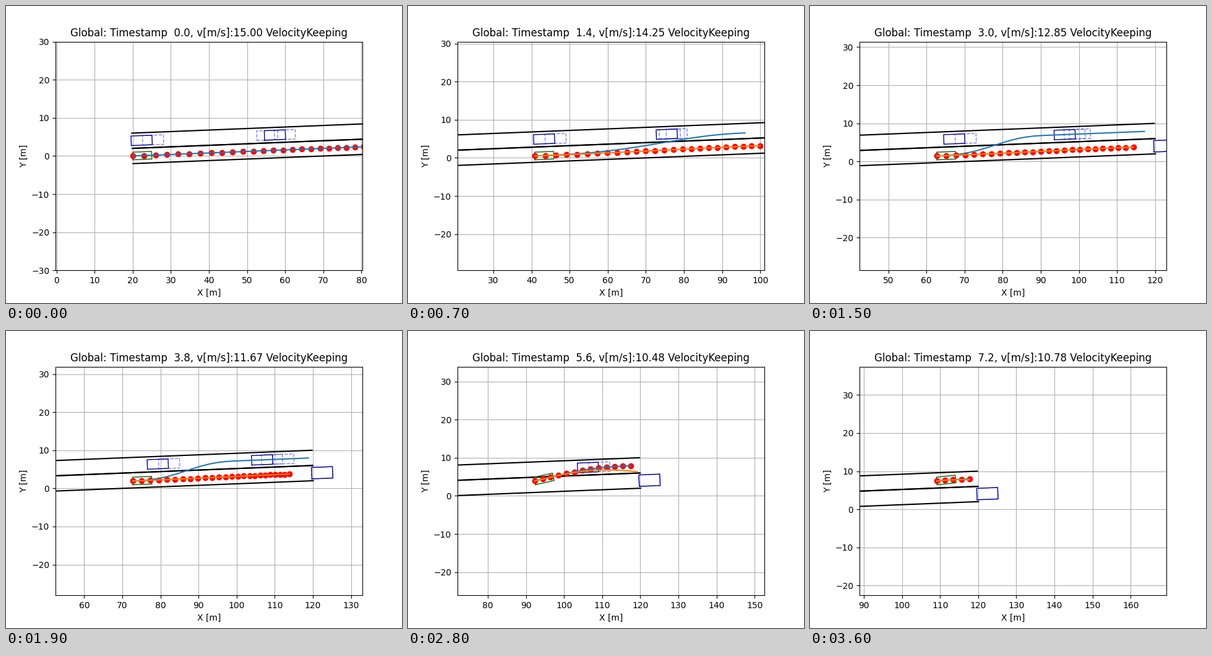
Recreate the animation shown at these times as a matplotlib script. Size 640 px wide and 480 px high, loop 3700 ms.

```python
import numpy as np
import matplotlib.pyplot as plt
from matplotlib.animation import FuncAnimation

DT, FRAMES = 0.2, 37
HORIZON, STEPS = 5.0, 25
ROAD_LEN = 100.08
THETA = np.arctan(0.04)
SWITCH, CHANGE_T0, CHANGE_T = 4.4, 4.34, 3.44

# Ego state at key times: position, speed along x, speed, acceleration
KEYS = np.array([0, 1.4, 3.0, 4.6, 5.6, 6.4, 7.2])
EGO_X = [20, 40.85, 62.7, 81.87, 92.3, 100.52, 109.12]
EGO_VX = [15, 14.25, 12.85, 10.69, 10.17, 10.35, 10.7]
EGO_V = [15, 14.25, 12.85, 10.69, 10.48, 10.65, 10.78]
EGO_A = [-0.1, -0.8, -1.2, -0.7, 0.1, 0.2, 0.15]

# Planner settings at the first five key times
START_ACC = [0, -0.9, -1.7, -0.12, 0]
KEEP_SPEED = [11, 11.05, 10.04, 2, 10]
CHANGE_SPEED = [9.4, 9.4, 11.35, 11, 11]
CHANGE_TIME = [5, 5, 2.5, 2.5, 2.5]
CHANGE_D = [3.5, 3.5, 4, 4, 4]

# Rear s at start, speed, width, whether the current box is drawn
CARS = [(0, 15, 2.5, True), (35, 13, 2.5, True),
        (30, 15, 2.5, False), (100, 0, 3.0, True)]


def to_xy(s, d):
    s, d = np.asarray(s, float), np.asarray(d, float)
    c, n = np.cos(THETA), np.sin(THETA)
    return 20 + s * c - d * n, s * n + d * c


def hermite(t, vals, slopes):
    i = int(np.clip(np.searchsorted(KEYS, t, "right") - 1, 0, len(KEYS) - 2))
    h = KEYS[i + 1] - KEYS[i]
    u = (t - KEYS[i]) / h
    return (vals[i] * (1 + 2 * u) * (1 - u) ** 2
            + slopes[i] * h * u * (1 - u) ** 2
            + vals[i + 1] * u * u * (3 - 2 * u)
            + slopes[i + 1] * h * u * u * (u - 1))


def at(t, vals):
    return np.interp(t, KEYS[:5], vals)


def smoother(u):
    return 10 * u**3 - 15 * u**4 + 6 * u**5


def quintic(t, d0, vel, acc, d1, T):
    u = np.clip(t / T, 0, 1)
    return (d0 + (d1 - d0) * smoother(u)
            + vel * T * (u - 6 * u**3 + 8 * u**4 - 3 * u**5)
            + acc * T * T * 0.5 * (u**2 - 3 * u**3 + 3 * u**4 - u**5))


def lateral(t):
    """Ego offset from the lane centre with its two derivatives."""
    w = t / 1.8
    drift = -0.36 * w * w * np.exp(2 * (1 - w))
    u = np.clip((t - CHANGE_T0) / CHANGE_T, 0, 1)
    span = 4 - drift
    k = np.clip(t - 4.6, 0, 1)
    vel = k * span * 30 * u**2 * (1 - u) ** 2 / CHANGE_T
    acc = k * span * (60 * u - 180 * u**2 + 120 * u**3) / CHANGE_T**2
    return drift + span * smoother(u), vel, acc


def plan(t, s0, v0, side, v1, d1, T):
    tau = np.arange(STEPS) * DT
    u = tau / HORIZON
    s = (s0 + v0 * tau
         + at(t, START_ACC) * HORIZON**2 * (u**4 / 4 - 2 * u**3 / 3 + u**2 / 2)
         + (v1 - v0) * HORIZON * (u**3 - u**4 / 2))
    d = quintic(tau, *side, d1, T)
    ok = s < 99.8
    return to_xy(s[ok], d[ok])


def car_box(ax, s, width, **style):
    if s > ROAD_LEN:
        return
    half = width / 2
    ax.plot(*to_xy([s - 0.25, s + 5.25, s + 5.25, s - 0.25, s - 0.25],
                   [-half, -half, half, half, -half] + style.pop("d")),
            lw=1, **style)


def ego_box(ax, x, y, yaw):
    a = np.array([0, 5, 5, 0, 0])
    b = np.array([-1, -1, 1, 1, -1])
    c, n = np.cos(yaw), np.sin(yaw)
    ax.plot(x + a * c - b * n, y + a * n + b * c, color="darkgreen", lw=1)


def draw(i):
    t = i * DT
    x, v = hermite(t, EGO_X, EGO_VX), hermite(t, EGO_V, EGO_A)
    side = lateral(t)
    s = (x - 20 + side[0] * np.sin(THETA)) / np.cos(THETA)
    y = float(to_xy(s, side[0])[1])

    ax.clear()
    for d in (-2, 2, 2, 6):
        ax.plot(*to_xy([0, ROAD_LEN], [d, d]), color="black", lw=1.5)

    for start, speed, width, solid in CARS:
        rear = start + speed * t
        d = np.full(5, 4.0 if speed else 0.0)
        if solid:
            car_box(ax, rear, width, d=d, color="darkblue")
        car_box(ax, rear + speed * DT, width, d=d,
                color="mediumblue", ls="--", alpha=0.5)
    ego_box(ax, x, y, THETA + np.arctan2(side[1], v))

    keep = plan(t, s, v, side, at(t, KEEP_SPEED), 0, HORIZON)
    paths = [keep]
    if t > 0.5:
        paths.insert(0, plan(t, s, v, side, at(t, CHANGE_SPEED),
                             at(t, CHANGE_D), at(t, CHANGE_TIME)))
    best = paths[0] if t > SWITCH - 0.01 else keep
    ax.plot(*best, "ro")
    for path, color in zip(paths, ("C0", "C1")):
        ax.plot(*path, color=color)

    ax.set_xlim(x - 20.26, x + 60.26)
    ax.set_ylim(y - 30, y + 30)
    ax.set_xlabel("X [m]")
    ax.set_ylabel("Y [m]")
    ax.set_title(f"Global: Timestamp {t:4.1f}, v[m/s]:{v:.2f} VelocityKeeping")
    ax.grid(True)
    return []


fig, ax = plt.subplots(figsize=(6.4, 4.8), dpi=100)
anim = FuncAnimation(fig, draw, frames=FRAMES, init_func=lambda: draw(0),
                     interval=100, repeat=True, repeat_delay=0)
plt.show()
```
